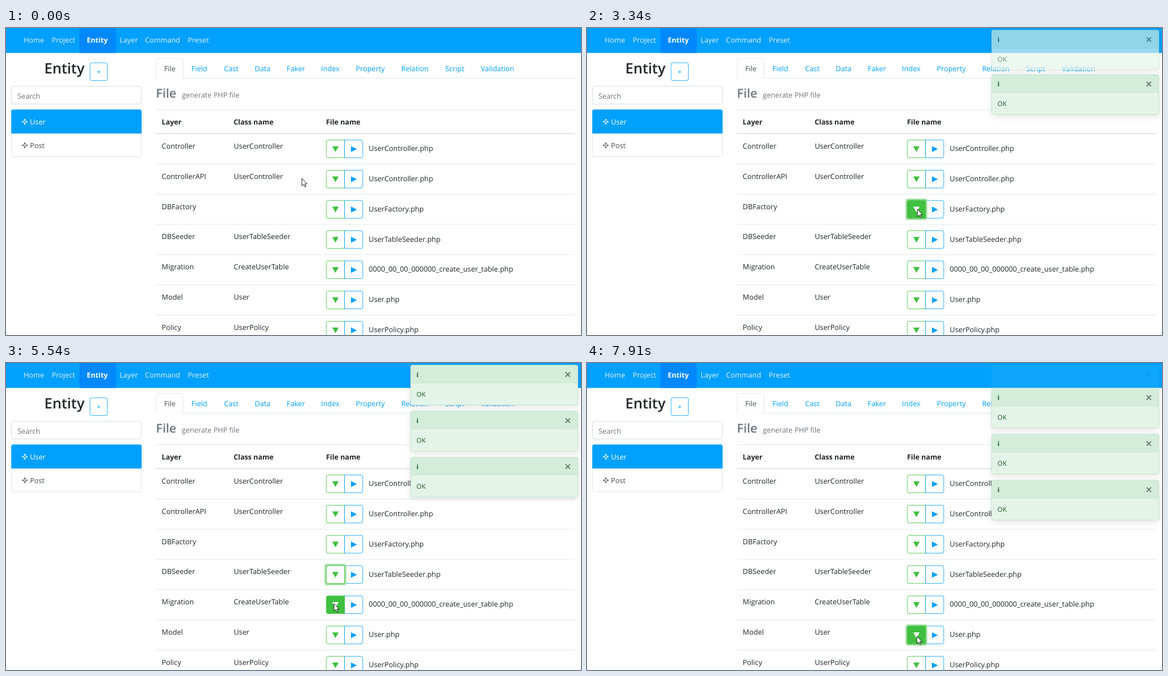
Write an HTML page that moves like this. It is 1025x547 px and loops after 7.99 s.

```html
<!DOCTYPE html>
<html lang="en">
<head>
<meta charset="utf-8">
<title>Entity files</title>
<style>
  html, body { margin: 0; width: 100%; height: 100%; overflow: hidden; background: #fff; }
  svg { display: block; }
  text { font: 15px "Open Sans", "Noto Sans", sans-serif; fill: #212529; white-space: pre; text-rendering: geometricPrecision; }
  .b { font-weight: 700; font-size: 14.8px; }
  .nav { fill: #dff2ff; }
  .white { fill: #fff; }
  .link { fill: #00a0ff; }
  .grey { fill: #6c757d; }
  .dark { fill: #495057; }
  .h2 { font-size: 30px; font-weight: 600; }
  .h4 { font-size: 25.5px; font-weight: 600; fill: #6c757d; }
  .toast { filter: drop-shadow(0 4px 6px rgba(0, 0, 0, .1)); }
  .toast text { fill: #155724; font-size: 13.6px; }
</style>
</head>
<body>
<!-- A 1200 x 640 page shown slightly reduced -->
<svg id="stage" width="1025" height="547" viewBox="0 0 1200 640" preserveAspectRatio="none" xmlns="http://www.w3.org/2000/svg"></svg>
<script>
const LOOP = 7990, BLUE = '#00a0ff', GREEN = '#40c040', LINE = '#dee2e6';
const stage = document.getElementById('stage');

function el(tag, attrs, parent = stage) {
  const node = document.createElementNS('http://www.w3.org/2000/svg', tag);
  for (const key in attrs) node.setAttribute(key, attrs[key]);
  parent.appendChild(node);
  return node;
}
function label(x, y, text, cls = '', parent = stage) {
  el('text', { x, y, class: cls }, parent).textContent = text;
}
function rect(x, y, width, height, fill, more = {}, parent = stage) {
  return el('rect', { x, y, width, height, fill, ...more }, parent);
}
function path(d, more, parent = stage) {
  return el('path', { d, ...more }, parent);
}
// Bordered box given by its outer edges
const box = (x, y, w, h, fill, stroke, parent) =>
  rect(x + .5, y + .5, w - 1, h - 1, fill, { rx: 3.5, stroke }, parent);
const hline = (y, h = 1) => rect(313, y, 874, h, LINE);
const clamp = v => Math.max(0, Math.min(1, v));

// Navigation bar
rect(0, 0, 1200, 52, BLUE);
rect(153, 0, 76, 52, '#0088ff');
[[37, 'Home'], [95.5, 'Project'], [237.2, 'Layer'], [290.2, 'Command'], [379.4, 'Preset']]
  .forEach(([x, s]) => label(x, 30, s, 'nav'));
label(168.5, 30, 'Entity', 'b white');

// Sidebar
label(80, 94.8, 'Entity', 'h2');
box(175, 72, 37, 38, '#fff', BLUE);
path('M190 91.500h7M193.500 88v7', { stroke: BLUE });
box(11, 121, 272, 38, '#fff', '#ced4da');
label(24, 147, 'Search', 'grey');
box(11, 170, 272, 99, '#fff', '#dfdfdf');
path('M11 220V174q0-4 4-4H279q4 0 4 4V220z', { fill: BLUE });

function moveIcon(y, color) {
  const g = el('g', { transform: `translate(39.3 ${y})`, fill: color });
  for (let a = 0; a < 360; a += 90)
    path('M0-6.200L2.600-3.200H.600V-.900H-.600V-3.200H-2.600z', { transform: `rotate(${a})` }, g);
}
moveIcon(195.5, '#fff');
label(50, 201.5, 'User', 'white');
moveIcon(244.5, '#495057');
label(50, 250.5, 'Post', 'dark');

// Tabs
hline(104);
path('M313.500 105V67q0-3.500 3.500-3.500H366q3.500 0 3.500 3.500V105', { fill: '#fff', stroke: LINE });
label(330, 90.5, 'File', 'dark');
[[387, 'Field'], [455, 'Cast'], [519, 'Data'], [585.7, 'Faker'], [657.5, 'Index'], [730, 'Property'],
 [824.7, 'Relation'], [916.6, 'Script'], [991, 'Validation']]
  .forEach(([x, s]) => label(x, 90.5, s, 'link'));
label(313, 145, 'File', 'h4');
label(367, 145, 'generate PHP file', 'grey');

// Table
const PITCH = 63, BUTTON = { x: 668, y: 233, w: 39, h: 38 };
hline(170);
hline(219, 2);
[[325, 'Layer'], [475, 'Class name'], [668, 'File name']]
  .forEach(([x, s]) => label(x, 201.5, s, 'b'));

const files = [
  ['Controller', 'UserController', 'UserController.php'],
  ['ControllerAPI', 'UserController', 'UserController.php'],
  ['DBFactory', '', 'UserFactory.php'],
  ['DBSeeder', 'UserTableSeeder', 'UserTableSeeder.php'],
  ['Migration', 'CreateUserTable', '0000_00_00_000000_create_user_table.php'],
  ['Model', 'User', 'User.php'],
  ['Policy', 'UserPolicy', 'UserPolicy.php']
];

const rows = files.map(([layer, cls, file], i) => {
  const dy = i * PITCH, top = BUTTON.y + dy;
  label(325, 251.5 + dy, layer);
  label(475.3, 251.5 + dy, cls);
  label(757, 256.3 + dy, file);
  hline(283 + dy);
  const g = el('g', { transform: `translate(${BUTTON.x} ${top})` });
  path('M38.500.500H73q3.500 0 3.500 3.500V34q0 3.500-3.500 3.500H38.500z', { fill: '#fff', stroke: BLUE }, g);
  path('M52 13.200L64.300 19.400L52 25.600z', { fill: BLUE }, g);
  const ring = rect(-3.2, -3.2, 45.4, 44.4, '#9fdf9f', { rx: 5 }, g);
  const face = path('M38.500.500H4q-3.500 0-3.500 3.500V34q0 3.500 3.500 3.500H38.500z', { stroke: GREEN }, g);
  const edge = rect(38, 0, 1, 38, BLUE, {}, g);
  const mark = path('M12.800 13.500H26.200L19.500 25.300z', {}, g);
  return { top, ring, face, edge, mark };
});

// Notifications, the newest on top: time of appearance and of removal
const toasts = [[1454, 6840], [3195], [4660], [6124], [7858]].map(([start, end = Infinity]) => ({ start, end }));
for (const toast of [...toasts].reverse()) {
  const g = toast.node = el('g', { class: 'toast' });
  box(0, 0, 350, 84, '#e4f4e8', 'none', g);
  path('M.500 38V4q0-3.500 3.500-3.500H346q3.500 0 3.500 3.500V38z', { fill: '#d4eddb' }, g);
  rect(1, 37, 348, 1, '#c9e4d0', {}, g);
  box(0, 0, 350, 84, 'none', '#bfe0c8', g);
  label(12.8, 25, 'i', 'b', g);
  label(12.8, 66, 'OK', '', g);
  path('M323.800 15.300l9.400 9.400m0-9.400l-9.400 9.400', { stroke: '#6a776e', 'stroke-width': 2.2 }, g);
}

const arrow = path('M.500.500V16.300L4.200 12.900L7 18.500L9.200 17.500L6.700 12H11z',
  { fill: '#fff', stroke: '#000', 'stroke-linejoin': 'round' });

// Pointer moves: begin, end, target x, target y
const moves = [
  [430, 985, 681, 308], [1070, 1120, 683, 308], [2090, 2485, 689, 373], [2640, 2790, 689, 377],
  [3510, 4140, 688, 440], [5000, 5625, 684, 504], [6805, 7275, 688, 560], [7360, 7595, 688, 569]
];
// Presses: time and table row
const presses = [[1375, 1], [3030, 2], [4460, 3], [5935, 4], [7680, 5]];

function pointer(t) {
  let x = 617, y = 313;
  for (const [begin, end, tx, ty] of moves) {
    const p = clamp((t - begin) / (end - begin)), s = p * p * (3 - 2 * p);
    x += (tx - x) * s;
    y += (ty - y) * s;
  }
  return [Math.round(x), Math.round(y)];
}

// Share of the last 150 ms that the pointer spent over the button
function hover(t, top) {
  let n = 0;
  for (let i = 0; i < 10; i++) {
    const [x, y] = pointer(t - i * 15);
    if (x >= BUTTON.x && x < BUTTON.x + BUTTON.w && y >= top && y < top + BUTTON.h) n++;
  }
  return n / 10;
}

function focus(t, row) {
  const i = presses.findIndex(p => p[1] === row);
  if (i < 0) return 0;
  const next = presses[i + 1];
  return clamp((t - presses[i][0]) / 140) - (next ? clamp((t - next[0]) / 140) : 0);
}

const mix = (a, b, p) => `rgb(${a.map((v, i) => Math.round(v + (b[i] - v) * p))})`;
const white = [255, 255, 255], green = [64, 192, 64];
const slide = p => 1 - (1 - clamp(p)) ** 2;

// The screen was refreshed at a fixed rate
const TICK = 78.82;
const snap = t => t < 500 ? 0 : 500 + Math.floor((t - 485) / TICK) * TICK;

function draw(time) {
  const t = snap(time);
  rows.forEach(({ top, ring, face, edge, mark }, i) => {
    const h = hover(t, top), f = focus(t, i);
    ring.setAttribute('opacity', f);
    face.setAttribute('fill', mix(white, green, h));
    edge.setAttribute('opacity', 1 - Math.max(h, f));
    mark.setAttribute('fill', mix(green, white, h));
  });
  toasts.forEach(({ node, start, end }, i) => {
    let y = 4;
    for (const later of toasts.slice(i + 1)) y += 96 * slide((t - later.start) / 175);
    const alpha = clamp((t - start - 41) / 150) - clamp((t - end) / 150);
    node.setAttribute('transform', `translate(844 ${Math.round(y)})`);
    node.setAttribute('opacity', alpha);
    node.setAttribute('display', alpha > 0 ? 'inline' : 'none');
  });
  arrow.setAttribute('transform', `translate(${pointer(t).join(' ')})`);
}

const origin = performance.now();
function frame() {
  draw((performance.now() - origin) % LOOP);
  requestAnimationFrame(frame);
}
frame();
</script>
</body>
</html>
```
